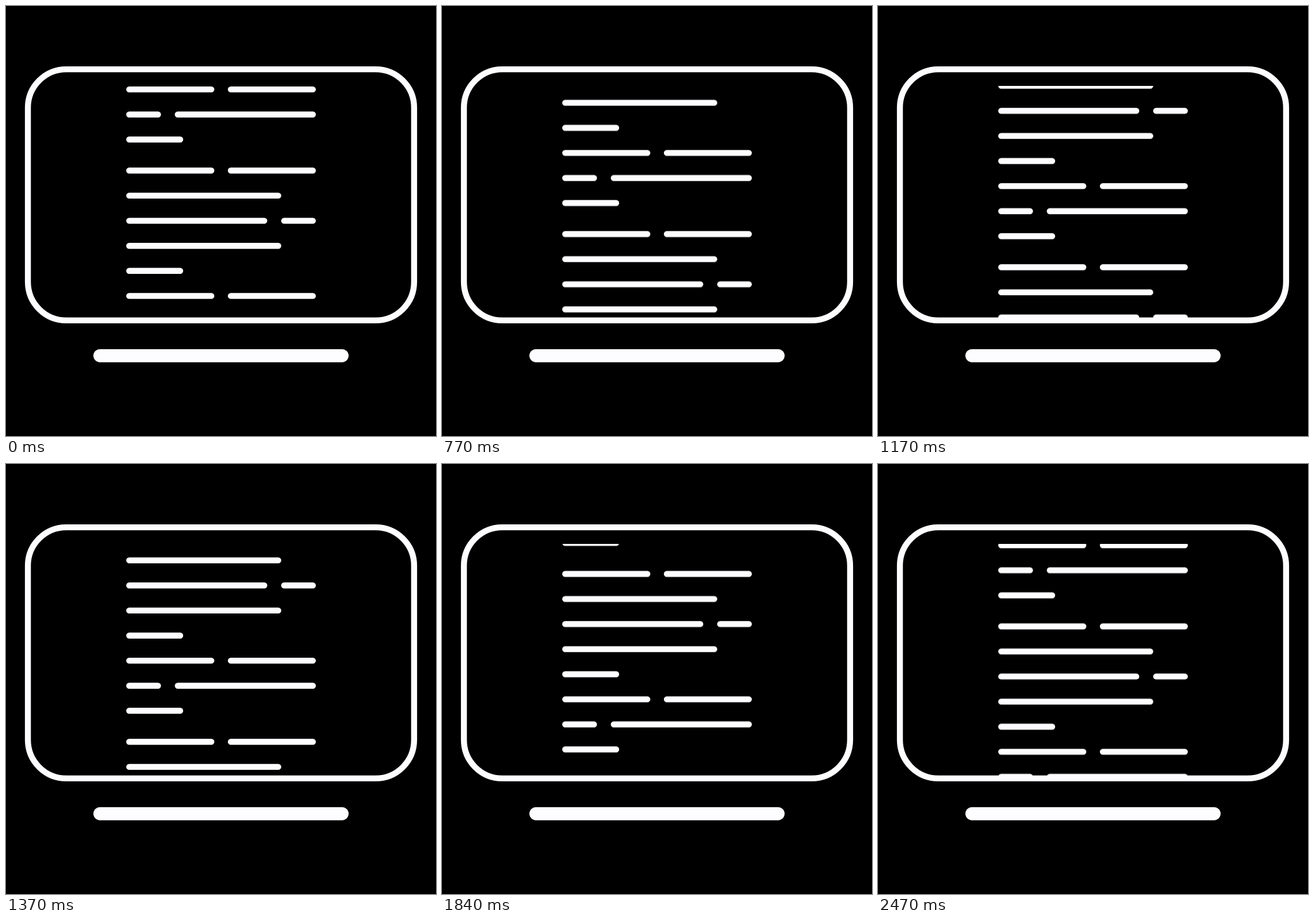
An HTML page for the animation above (2.5 s loop, 748x748 px).

```html
<!DOCTYPE html>
<html lang="en">
<head>
<meta charset="utf-8">
<title>Scrolling code</title>
<style>
  html, body { margin: 0; width: 100%; height: 100%; overflow: hidden; background: #000; }
  svg { display: block; width: 748px; height: 748px; fill: none; stroke: #fdfdff; stroke-linecap: round; }
  .screen, .lines { stroke-width: 10.4; }
  .base { stroke-width: 22.8; }
  /* 30 steps per second; the small lead aligns them to 10 ms ticks */
  .lines { animation: scroll 2500ms steps(75) -3.4ms infinite; }
  @keyframes scroll { to { transform: translateY(360.3px); } }
</style>
</head>
<body>
<svg viewBox="0 0 748 748">
  <defs>
    <clipPath id="view"><rect x="200" y="139" width="348" height="408"/></clipPath>
    <path id="block" d="
      M214.3 145.1H357.2 M391.1 145.1H533.8
      M214.3 188.7H264.4 M298.8 188.7H533.8
      M214.3 232.3H303
      M214.3 286.3H357.2 M391.1 286.3H533.8
      M214.3 329.9H473.6
      M214.3 373.6H449.3 M483.8 373.6H533.8
      M214.3 417.2H473.6
      M214.3 460.8H303"/>
  </defs>
  <g clip-path="url(#view)">
    <g class="lines">
      <use href="#block" y="-359.3"/>
      <use href="#block"/>
      <use href="#block" y="359.3"/>
    </g>
  </g>
  <rect class="screen" x="38.1" y="110.1" width="671.8" height="436.8" rx="66.8"/>
  <path class="base" d="M163.4 608.3H584.6"/>
</svg>
</body>
</html>
```
